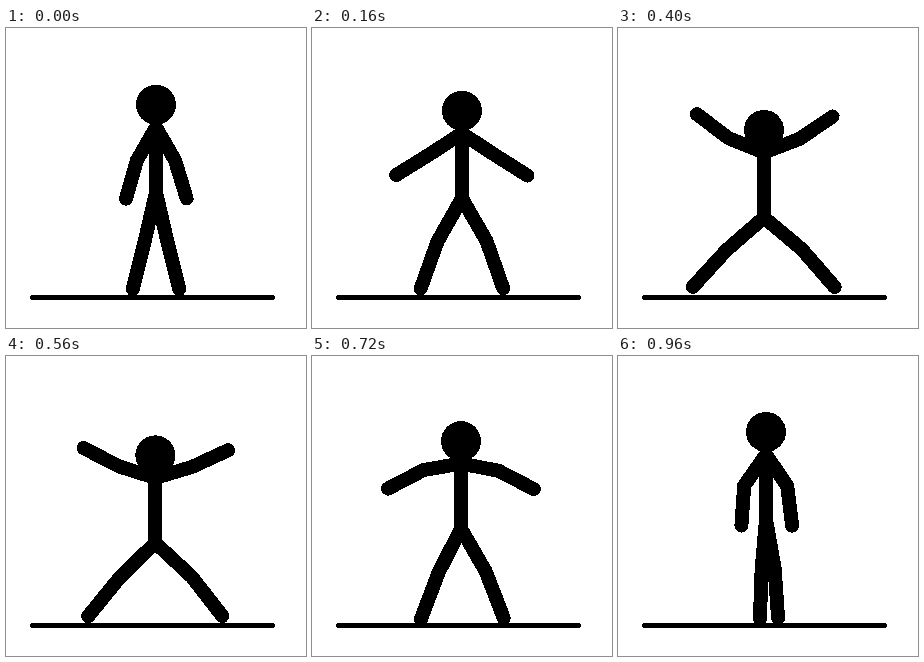
Animation, 300 px wide and 300 px high, one loop 1.04 s. Source, as an HTML page:

```html
<!DOCTYPE html>
<html lang="en">
<head>
<meta charset="utf-8">
<title>Jumping figure</title>
<style>
html, body { margin: 0; width: 100%; height: 100%; overflow: hidden; background: #fff; }
svg { display: block; width: 100vw; height: 100vh; shape-rendering: crispEdges; }
path { fill: none; stroke: #000; stroke-width: 14; stroke-linecap: round; stroke-linejoin: miter; }
#ground { stroke-width: 5; }
</style>
</head>
<body>
<svg viewBox="0 0 300 300">
  <path id="ground" d="M26.5 269.5H266.5"/>
  <circle id="head" r="20"/>
  <path id="body"/>
</svg>
<script>
const STEP = 80, COUNT = 13;
const TOP = 5, FALL = 6, END = 12;   // steps: top reached, fall begins, rest
const TORSO = 65, NECK = 22.5;

// pace: speed at the start of the rise, at its end, and at the end of the fall
// left, right: degrees away from straight down at start, top and end
const arm = [
  { len: 38, pace: [.7, 1.3, .7], left: [30, 112, 35], right: [30, 111, 34] },
  { len: 40, pace: [.2, 0, -.2], left: [16, 127, 4], right: [17, 124, 7] }
];
const leg = [
  { len: 49.5, pace: [.8, .1, 0], left: [13, 49, 5], right: [13, 50, 10] },
  { len: 50, pace: [-.2, 1.3, -.3], left: [14, 42.5, 2], right: [14, 41, 4] }
];
const hipSwing = { range: [164.3, 189.5, 163.5], pace: [-.2, .9, -1.2] };

const clamp = u => Math.min(1, Math.max(0, u));

// Cubic ease from 0 to 1 with given speeds at both ends
const ease = (u, v0, v1) =>
  u * u * (3 - 2 * u) + v0 * u * (1 - u) ** 2 - v1 * u * u * (1 - u);

function swing(t, [start, top, end], [out, into, settle]) {
  return t <= TOP
    ? start + (top - start) * ease(t / TOP, out, into)
    : end + (top - end) * ease(clamp((END - t) / (END - FALL)), settle, 0);
}

// Joints of a limb, each bone hanging from the last
function limb(t, root, bones, side) {
  const points = [root];
  for (const bone of bones) {
    const [x, y] = points.at(-1);
    const a = swing(t, bone[side], bone.pace) * Math.PI / 180;
    const dir = side === "left" ? -1 : 1;
    points.push([x + dir * bone.len * Math.sin(a), y + bone.len * Math.cos(a)]);
  }
  return points;
}

// A quick lean to the left at the top, then a small drift while settling
const bodyX = t => 150 - 4 * Math.exp(-(((t - TOP) / 1.5) ** 2)) - 2 * clamp((t - 8) / 2);

const line = points => "M" + points.map(p => p.map(n => n.toFixed(2)).join(" ")).join("L");
const head = document.getElementById("head");
const body = document.getElementById("body");

function draw(t) {
  const x = bodyX(t), y = swing(t, hipSwing.range, hipSwing.pace);
  const hip = [x, y], neck = [x, y - TORSO];
  const parts = [[neck, hip]];
  for (const side of ["left", "right"]) {
    parts.push(limb(t, neck, arm, side), limb(t, hip, leg, side));
  }
  head.setAttribute("cx", x);
  head.setAttribute("cy", neck[1] - NECK);
  body.setAttribute("d", parts.map(line).join(""));
}

const start = performance.now();
function tick() {
  draw(Math.floor((performance.now() - start) / STEP) % COUNT);
  requestAnimationFrame(tick);
}
tick();
</script>
</body>
</html>
```
